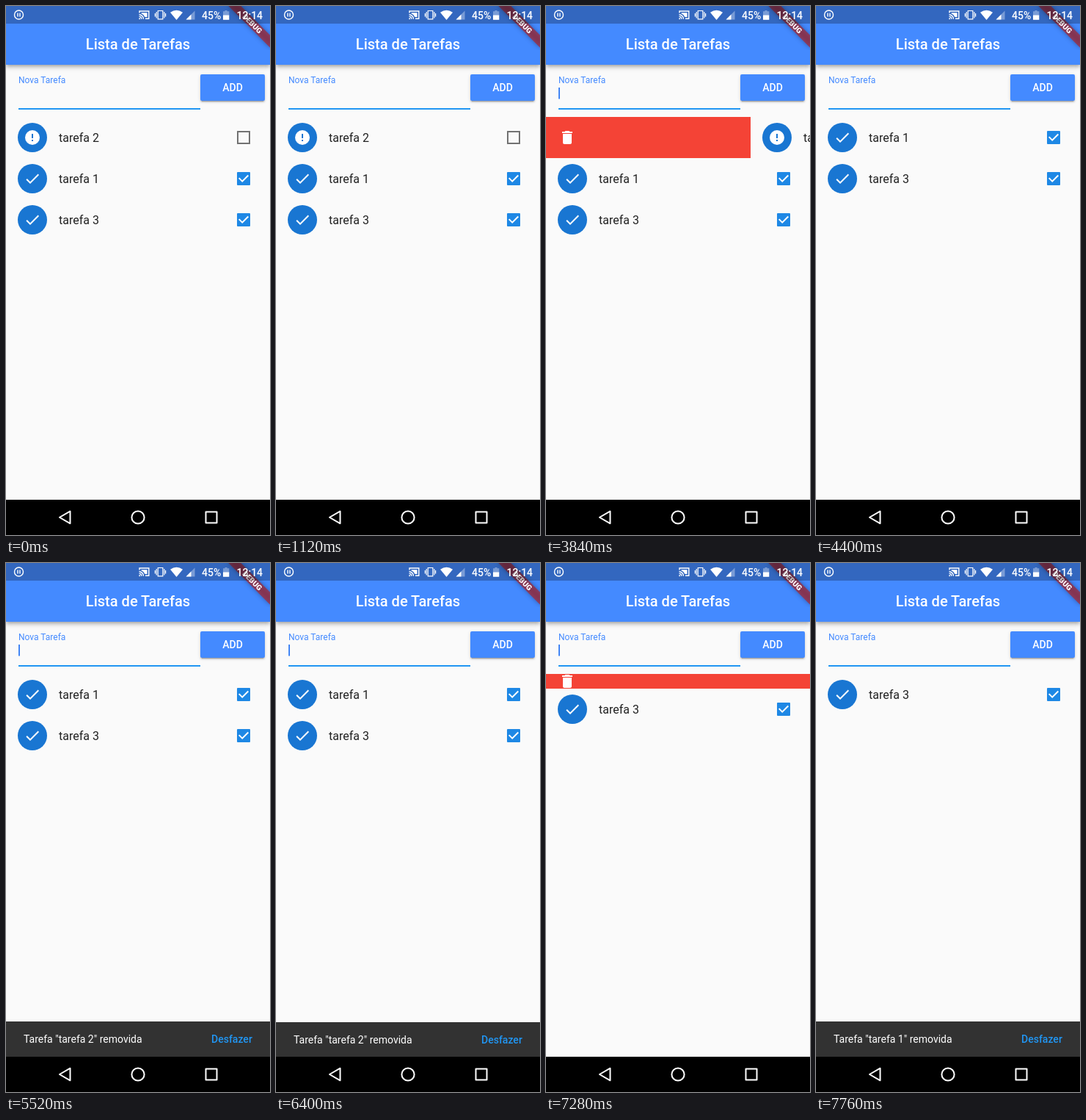
These frames come from a looping animation (360 by 720 pixels, 8 s). An HTML page:

```html
<!DOCTYPE html>
<html lang="pt">
<head>
<meta charset="utf-8">
<title>Lista de Tarefas</title>
<style>
@property --x { syntax: '<length>'; inherits: true; initial-value: 0px; }

html, body { margin: 0; width: 100%; height: 100%; overflow: hidden; }
body { position: relative; background: #fafafa; font-family: Roboto, sans-serif; }
body > *, .row > * { position: absolute; }
svg { display: block; overflow: visible; }
text { white-space: pre; }

.appbar {
  left: 0; top: 0; width: 360px; height: 80px; background: #448aff;
  box-shadow: 0 2px 4px -1px #0003, 0 4px 5px #00000024, 0 1px 10px #0000001f;
}
.add {
  left: 265px; top: 93px; width: 88px; height: 36px; border-radius: 2px; background: #448aff;
  box-shadow: 0 3px 1px -2px #0003, 0 2px 2px #00000024, 0 1px 5px #0000001f;
}
.layer { left: 0; top: 0; }

.list { left: 0; top: 151px; width: 360px; }
.row { position: relative; height: 56px; overflow: hidden; }
.tile { left: 0; top: 0; transform: translateX(var(--x)); }
.bg { left: 0; top: 0; width: var(--x); height: 100%; overflow: hidden; background: #f44336; }
.bg svg { position: absolute; left: 16.8px; top: calc(50% - 12px); }

.snack { left: 0; top: 624px; width: 360px; height: 48px; background: #323232; transform: translateY(48px); }
.nav { left: 0; top: 672px; background: #000; }

.cursor { animation: blink 8s step-end infinite; }
.first { animation: swipe1 8s linear infinite, fold1 8s infinite; }
.second { animation: swipe2 8s linear infinite, fold2 8s infinite; }
.snack1 { animation: snack1 8s infinite; }
.snack2 { animation: snack2 8s infinite; }

@keyframes blink {
  0%, 11.9%, 24.9%, 37.5%, 49.9%, 61.9%, 76.9%, 86%, 96.9% { opacity: 0; }
  6%, 18.9%, 30.9%, 43.9%, 57.9%, 68.9%, 79.9%, 90.9% { opacity: 1; }
}
@keyframes swipe1 {
  0%, 39.5% { --x: 0px; }
  39.8% { --x: 22px; }
  40% { --x: 26.5px; animation-timing-function: cubic-bezier(.4, .2, .7, .7); }
  47% { --x: 200px; animation-timing-function: ease-out; }
  50%, 100% { --x: 360px; }
}
@keyframes fold1 {
  0%, 51.9% { height: 56px; animation-timing-function: ease; }
  54.1%, 100% { height: 0; }
}
@keyframes swipe2 {
  0%, 81.2% { --x: 0px; }
  82% { --x: 22px; animation-timing-function: cubic-bezier(.4, .2, .7, .7); }
  86.2% { --x: 200px; animation-timing-function: ease-out; }
  88.6%, 100% { --x: 360px; }
}
@keyframes fold2 {
  0%, 90.18% { height: 56px; animation-timing-function: ease; }
  92.43%, 100% { height: 0; }
}
@keyframes snack1 {
  0%, 57.2% { transform: translateY(48px); animation-timing-function: cubic-bezier(.4, 0, .2, 1); }
  59%, 79.44% { transform: none; animation-timing-function: cubic-bezier(.8, 0, .6, 1); }
  82.56%, 100% { transform: translateY(48px); }
}
@keyframes snack2 {
  0%, 92.7% { transform: translateY(48px); animation-timing-function: cubic-bezier(.4, 0, .2, 1); }
  95.9%, 100% { transform: none; }
}
</style>
</head>
<body>
<svg width="0" height="0">
  <defs>
    <g id="done">
      <circle cx="36" cy="28" r="20" fill="#1976d2"/>
      <path transform="translate(24 16)" fill="#fff" d="M9 16.17 4.83 12l-1.42 1.41L9 19 21 7l-1.41-1.41z"/>
      <rect x="315" y="19" width="18" height="18" rx="1" fill="#1e88e5"/>
      <path d="M317.7 27.1l4.5 4.5 8.1-8.1" fill="none" stroke="#fff" stroke-width="2"/>
    </g>
    <g id="todo">
      <circle cx="36" cy="28" r="20" fill="#1976d2"/>
      <circle cx="36" cy="28" r="10" fill="#fff"/>
      <path d="M35 23h2v6h-2zm0 8h2v2h-2z" fill="#1976d2"/>
      <rect x="316" y="20" width="16" height="16" fill="none" stroke="#000" stroke-opacity=".54" stroke-width="2"/>
    </g>
    <path id="trash" fill="#fff" d="M6 19c0 1.1.9 2 2 2h8c1.1 0 2-.9 2-2V7H6zM19 4h-3.5l-1-1h-5l-1 1H5v2h14z"/>
  </defs>
</svg>

<div class="appbar"></div>
<div class="add"></div>
<svg class="layer" width="360" height="145">
  <g fill="#fff" font-weight="500" text-anchor="middle">
    <text x="180" y="59.3" font-size="20">Lista de Tarefas</text>
    <text x="309" y="116" font-size="14">ADD</text>
  </g>
  <text x="17" y="104.5" font-size="12" fill="#448aff">Nova Tarefa</text>
  <rect x="17" y="139" width="248" height="2" fill="#2196f3"/>
  <rect class="cursor" x="17" y="111" width="2" height="15.5" fill="#4285f4"/>
</svg>

<div class="list">
  <div class="row first">
    <div class="bg"><svg width="24" height="24"><use href="#trash"/></svg></div>
    <svg class="tile" width="360" height="56"><use href="#todo"/><text x="72" y="33.7" fill-opacity=".87">tarefa 2</text></svg>
  </div>
  <div class="row second">
    <div class="bg"><svg width="24" height="24"><use href="#trash"/></svg></div>
    <svg class="tile" width="360" height="56"><use href="#done"/><text x="72" y="33.7" fill-opacity=".87">tarefa 1</text></svg>
  </div>
  <div class="row">
    <svg class="tile" width="360" height="56"><use href="#done"/><text x="72" y="33.7" fill-opacity=".87">tarefa 3</text></svg>
  </div>
</div>

<svg class="snack snack1" font-size="14">
  <text x="24" y="29" fill="#fff">Tarefa "tarefa 2" removida</text>
  <text x="280" y="29" fill="#2196f3" font-weight="500">Desfazer</text>
</svg>
<svg class="snack snack2" font-size="14">
  <text x="24" y="29" fill="#fff">Tarefa "tarefa 1" removida</text>
  <text x="280" y="29" fill="#2196f3" font-weight="500">Desfazer</text>
</svg>

<svg class="nav" width="360" height="48" fill="none" stroke="#fff" stroke-width="2" stroke-linejoin="round">
  <path d="M73 24l14.5-8.3v16.6z"/>
  <circle cx="180" cy="24" r="8.6"/>
  <rect x="272.5" y="16.5" width="15" height="15"/>
</svg>

<svg class="layer" width="360" height="60" style="overflow:hidden">
  <g transform="translate(360 0) rotate(45)">
    <rect x="-40" y="28" width="80" height="12" fill="#b71c1c" fill-opacity=".63" style="filter:drop-shadow(0 0 3px #0008)"/>
    <text y="37.7" font-size="10.2" font-weight="900" fill="#fff" text-anchor="middle">DEBUG</text>
  </g>
  <rect width="360" height="24" fill-opacity=".25"/>
  <g fill="none" stroke="#fff" stroke-width="1.4">
    <circle cx="17.5" cy="12" r="6"/>
    <path d="M16 9.5v5m3-5v5"/>
    <path d="M182 9.5V7h12.8v10.3H190M181.5 11.7a6 6 0 0 1 6 6m-6-3.3a3.3 3.3 0 0 1 3.3 3.3"/>
    <path d="M207.2 6.5h6.6v11.4h-6.6zM205.2 8v8.4m10.6-8.4v8.4M203.4 10v4.4m14.2-4.4v4.4" stroke-width="1.2"/>
  </g>
  <g fill="#fff">
    <path d="M184.5 9.2h8v5.8h-3.2a8 8 0 0 0-4.8-4.7z"/>
    <circle cx="182.2" cy="17.2" r="1"/>
    <path d="M232.5 19 224 8.7q8.5-6 17 0z"/>
    <path d="M257.5 6.5V18.5h-12z" fill-opacity=".35"/>
    <path d="M252.5 11.5v7h-7z"/>
    <path d="M296 7.2h2.5V6h3v1.2h2.8V13H296z" fill-opacity=".35"/>
    <path d="M296 12.5h8.3v6.3H296z"/>
    <g font-size="14" font-weight="500">
      <text x="267" y="17.5">45%</text>
      <text x="314.5" y="17.5">12:14</text>
    </g>
  </g>
</svg>
</body>
</html>
```
